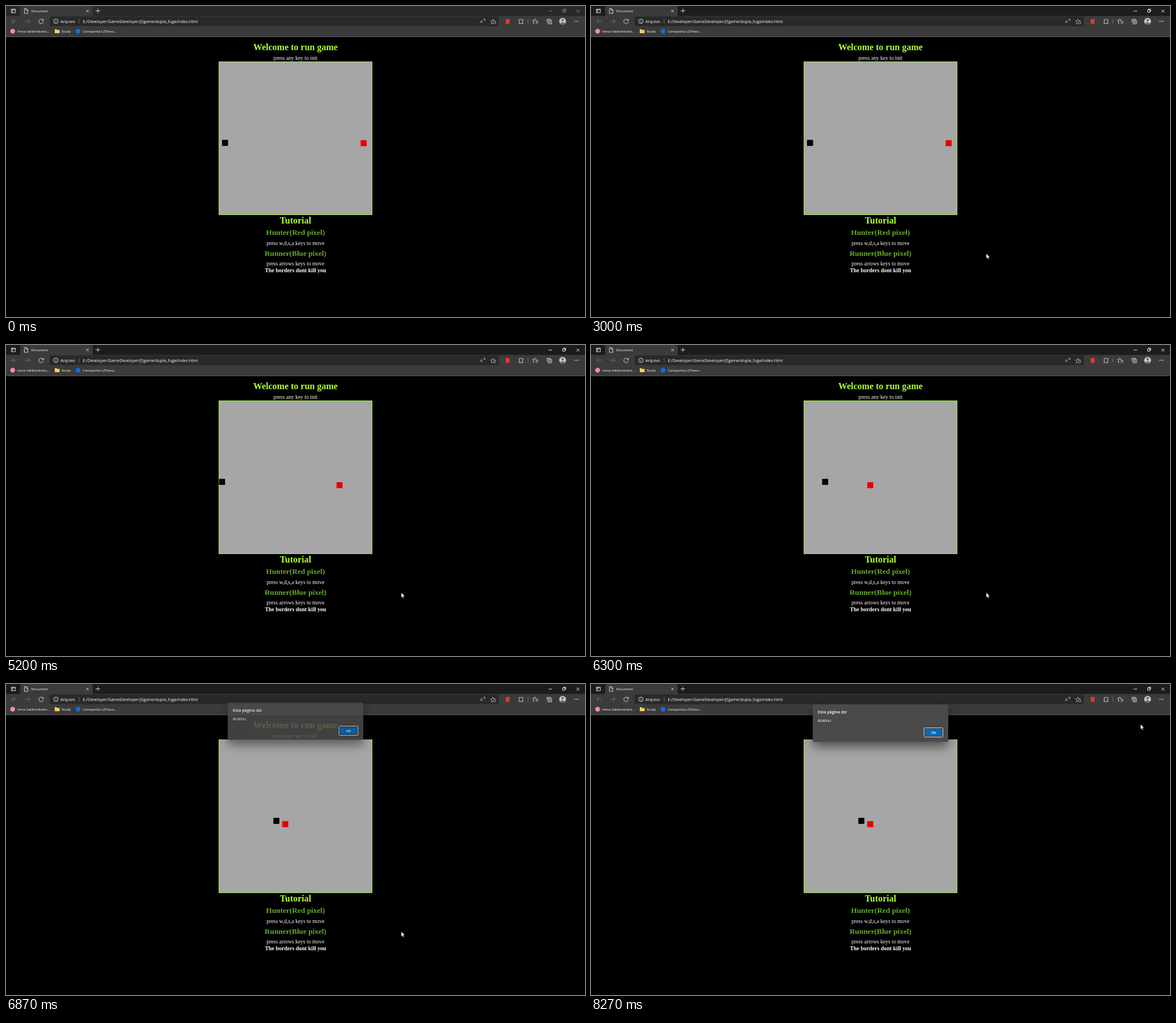
An HTML page that plays this animation: 1021x549 px, repeating every 8300 ms.

```html
<!DOCTYPE html>
<html lang="pt">
<head>
<meta charset="utf-8">
<title>Run game</title>
<style>
  html, body { margin: 0; width: 100%; height: 100%; overflow: hidden; background: #000; }
  svg { display: block; }
  text { fill: #fff; }
  .ui { font-family: "Open Sans", "Noto Sans", sans-serif; font-size: 6.1px; }
  .page { font-family: "Liberation Serif", "Times New Roman", serif; font-size: 9.6px; text-anchor: middle; }
  .h1 { font-size: 16px; font-weight: bold; fill: #adff2f; }
  .h3 { font-size: 13.3px; font-weight: bold; fill: #66aa2a; }
  .icon { fill: none; stroke: #e4e4e4; stroke-width: .9; }
  .dim { stroke: #777; }
  #dialog { filter: drop-shadow(0 9px 9px rgba(0, 0, 0, .5)); }
</style>
</head>
<body>
<svg width="1021" height="549" viewBox="0 0 1021 549">
  <rect width="1021" height="549"/>

  <!-- browser bars -->
  <rect id="strip" width="1021" height="18"/>
  <path d="M0 17.5H25V3q0-3 3-3H150q3 0 3 3V17.5H1021V54H0z" fill="#3b3b3c"/>
  <rect y="54" width="1021" height="1" fill="#58585a"/>
  <rect x="77" y="18.5" width="792" height="17" rx="2" fill="#29292b"/>

  <g class="icon">
    <path d="M9.5 5.5h7v6.5h-7zM9.5 7h7M11.5 7v5"/>
    <path d="M32.5 4.5h3.5l2.5 2.5v6h-6zM35.5 4.5v3h3"/>
    <path d="M141.5 6.5l4.5 4.500M146 6.500l-4.500 4.500M158 8.500h8M162 4.500v8"/>
    <path class="dim" d="M19 27h-9m4-4-4 4 4 4M33.500 27h9m-4-4 4 4-4 4"/>
    <path d="M65.500 25.500a4 4 0 1 0 .3 2.500M66 23v2.800h-2.800"/>
    <circle cx="88" cy="27" r="4"/>
    <path d="M88 26.500v2.800M88 24.500v1"/>
    <path class="dim" d="M129 23v8M920.500 23v8"/>
    <path stroke="#bbb" d="M842 23q1.500 1 1 3M843.500 22q2 1.500 1 4"/>
    <path stroke="#bbb" d="M858.500 30.500l-2.500 1 .5-3-2-2 3-.5 1.300-2.700 1.300 2.700 3 .4"/>
    <circle cx="861.500" cy="29.500" r="2.200" stroke="#bbb"/>
    <path d="M905 24h2.500q1-2 2 0h2v2.500q-2.500.8 0 2V31h-6.500z"/>
    <path d="M931.500 30l-1.500.8.4-3-2-2 2.800-.4 1.300-2.600 1.300 2.600 2 .4M934 27.500h4.500M934 30h4.500"/>
    <path d="M954 28.500v-5h6v1.500M956 25.500h6v6h-6zM959 27v3M957.500 28.500h3"/>
  </g>
  <rect x="881" y="23" width="7" height="8.500" fill="#e0392b"/>
  <circle cx="981.500" cy="27" r="6" fill="#c9c9cb"/>
  <path d="M977 31q4.500-5 9 0-4.500 4-9 0" fill="#6d6d70"/>
  <circle cx="981.500" cy="25" r="2.200" fill="#6d6d70"/>
  <path d="M1002.500 27h7" stroke="#eee" stroke-width="1.300" stroke-dasharray="1.300 1.500"/>
  <path id="controls" class="icon" d="M957 9h6M981.500 7h4v4h-4zM983 7V5.500h4v4h-1.500M1006 6.500l5 5M1011 6.500l-5 5"/>

  <circle cx="11.700" cy="44.500" r="4.200" fill="#ee8fa8"/>
  <path d="M86 41h3l1 1.200h4.500V48H86z" fill="#f7cf5b"/>
  <circle cx="127" cy="44.500" r="4.200" fill="#1769e0"/>

  <g class="ui">
    <text x="44.500" y="10.700">Document</text>
    <text x="96" y="29.600" font-size="7.200">Arquivo</text>
    <text x="135.500" y="29.600" font-size="7.120">E:/Developer/GameDeveloper/JSgame/dupla_fuga/index.html</text>
    <text x="836" y="30" font-size="7.500" style="fill:#bbb">A</text>
    <text x="20" y="46.800">Irena Valdombrets...</text>
    <text x="98" y="46.800">Study</text>
    <text x="135.500" y="46.800">Campanha LZTrevo...</text>
  </g>

  <!-- game page -->
  <g class="page">
    <text class="h1" x="510.500" y="78">Welcome to run game</text>
    <text x="510.500" y="95">press any key to init</text>
    <text class="h1" x="510.500" y="384">Tutorial</text>
    <text class="h3" x="510.500" y="404">Hunter(Red pixel)</text>
    <text x="510.500" y="421.500">press w,d,s,a keys to move</text>
    <text class="h3" x="510.500" y="441">Runner(Blue pixel)</text>
    <text x="510.500" y="458">press arrows keys to move</text>
    <text x="510.500" y="470" font-weight="bold" style="font-size:9.95px">The borders dont kill you</text>
  </g>
  <rect x="375.500" y="98.500" width="270" height="270" fill="#a6a6a7" stroke="#a4ee38"/>
  <rect id="runner" width="10.600" height="10.600"/>
  <rect id="hunter" width="10.600" height="10.600" fill="#ea0000"/>

  <g id="dialog" class="ui">
    <rect x="391" y="36" width="239" height="66" rx="2" fill="#4a4a4b"/>
    <text x="400" y="51.500" font-weight="600" style="font-size:7.1px">Esta página diz</text>
    <text x="400" y="66.500" style="font-size:6.6px">Acabou</text>
    <rect x="587.500" y="77.500" width="33" height="16" rx="1" fill="#222" stroke="#e8e8e8"/>
    <rect x="589" y="79" width="30" height="13" fill="#0a6ab8"/>
    <text x="604" y="87.500" font-weight="600" text-anchor="middle">OK</text>
  </g>

  <path id="cursor" d="M0 0v9l2-1.800 1.400 3 1.500-.7-1.400-2.900h2.900z" fill="#fff" stroke="#000" stroke-width=".5"/>
</svg>
<script>
  const LOOP = 8300, STEP = 5.32;
  const $ = id => document.getElementById(id);
  const place = (id, x, y) => $(id).setAttribute('transform', `translate(${x} ${y})`);

  // Linear track of [time, ...values] points, held at both ends.
  function track(points, t) {
    if (t <= points[0][0]) return points[0].slice(1);
    for (let i = 1; i < points.length; i++) {
      const [a, b] = [points[i - 1], points[i]];
      if (t < b[0]) {
        const k = (t - a[0]) / (b[0] - a[0]);
        return a.slice(1).map((v, j) => v + (b[j + 1] - v) * k);
      }
    }
    return points.at(-1).slice(1);
  }

  // Number of key repeats fired by time t.
  const repeats = (t, start, every, max) =>
    Math.max(0, Math.min(max, Math.floor((t - start) / every)));

  const pointer = [[2170, 640, 549], [2500, 690, 470], [2900, 697, 437], [7140, 697, 437],
    [7400, 770, 350], [7700, 920, 150], [7970, 998, 62], [8270, 969, 71]];
  const popup = [[6710, 0, -10], [6740, .08, -9], [6870, .87, -3], [7130, .87, -3], [7150, 1, 0]];

  function draw(t) {
    const focused = t >= 2850;
    $('strip').setAttribute('fill', focused ? '#1c1c1d' : '#29292a');
    $('controls').style.stroke = focused ? '#fff' : '#888';

    const right = repeats(t, 6080, 34, 18) - (t >= 3770);
    place('runner', 381 + right * STEP, 236.3);
    place('hunter', 625.4 - repeats(t, 4980, 25, 26) * STEP, 236.8 + (t >= 3470) * STEP);

    const [opacity, dy] = track(popup, t);
    $('dialog').style.opacity = opacity;
    place('dialog', 0, dy);

    $('cursor').style.display = t < 2170 ? 'none' : '';
    place('cursor', ...track(pointer, t));
  }

  function tick() {
    draw(performance.now() % LOOP);
    requestAnimationFrame(tick);
  }
  tick();
</script>
</body>
</html>
```
